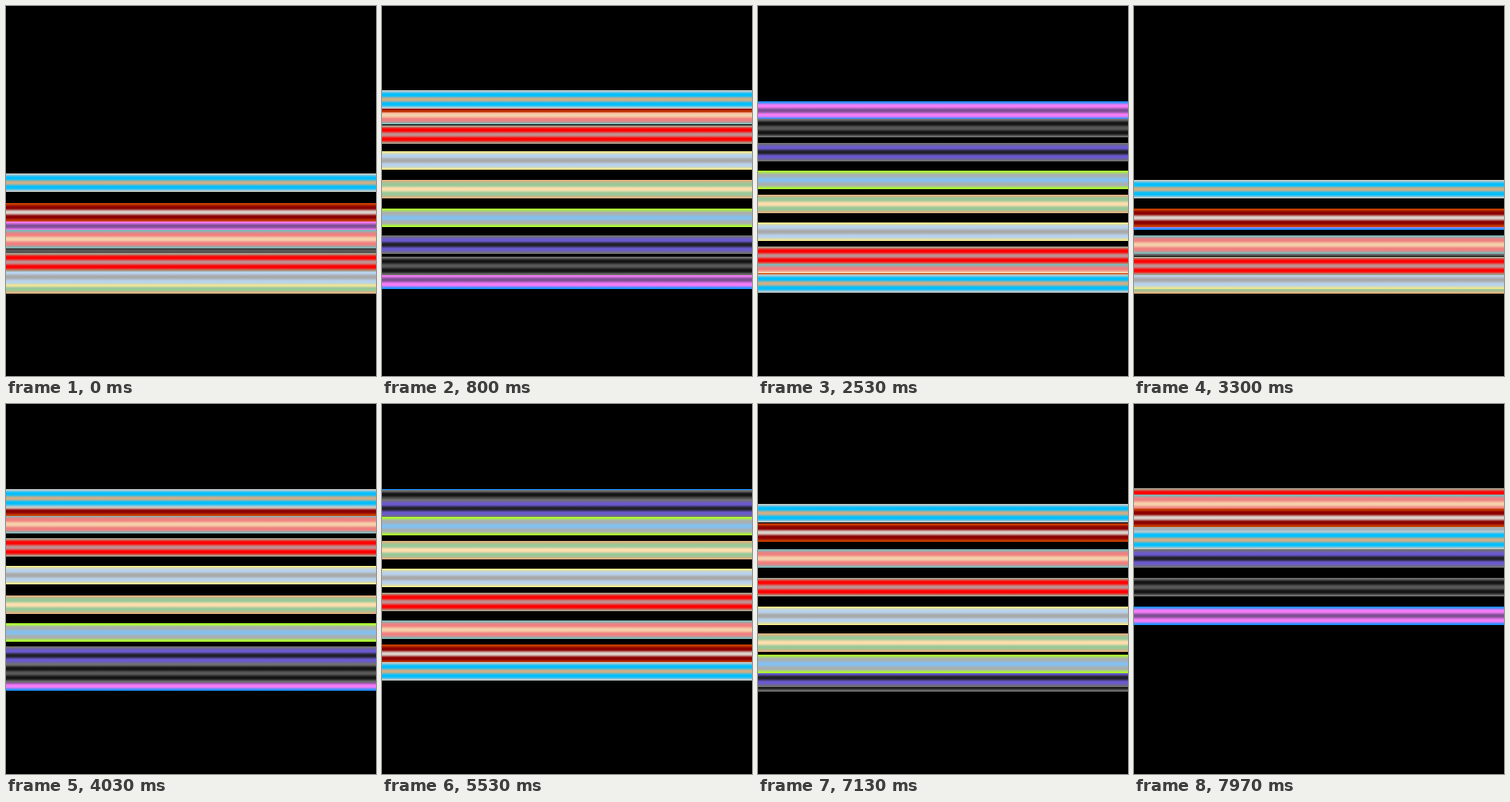
Recreate the animation shown at these times as an HTML page with a canvas. Size 400x400 px, loop 8000 ms.

```html
<!DOCTYPE html>
<html lang="en">
<head>
<meta charset="utf-8">
<title>Raster bars</title>
<style>
  html, body { margin: 0; width: 100%; height: 100%; overflow: hidden; background: #000; }
  canvas { display: block; width: 400px; height: 400px; }
</style>
</head>
<body>
<canvas id="stage" width="400" height="400"></canvas>
<script>
const SIZE = 400, BAR = 20, MIDDLE = 191, SWING = 100;
const LOOP_MS = 8000, FPS = 30;
const WAVE_STEPS = 100, BAR_LAG = 5, START_STEP = 48;

// Edge, body and core colour of each bar, front to back.
const bars = [
  ['#c0c8c8', '#00bfff', '#cdae88'],
  ['#c84000', '#8b0000', '#dcd2ca'],
  ['#7fb8b8', '#f08080', '#f5d0a9'],
  ['#a9a08c', '#ff0000', '#c09090'],
  ['#f0e68c', '#b8d2ec', '#a9a9a9'],
  ['#deb080', '#98c898', '#ffdead'],
  ['#adff2f', '#a9b0b0', '#84c0f0'],
  ['#707070', '#6a5acd', '#202028'],
  ['#707070', '#141414', '#585858'],
  ['#1e90ff', '#f57cf8', '#804f96']
];

const ctx = document.getElementById('stage').getContext('2d');

function barGradient([edge, body, core]) {
  const gradient = ctx.createLinearGradient(0, 0, 0, BAR);
  [edge, body, core, body, edge].forEach((color, i) => {
    const at = i / 4;
    gradient.addColorStop(Math.max(0, at - 0.05), color);
    gradient.addColorStop(Math.min(1, at + 0.05), color);
  });
  return gradient;
}

const fills = bars.map(barGradient);

// The wave includes both of its end points, so each bar rests briefly where it wraps.
function barTop(index, tick) {
  const step = (START_STEP - tick + BAR_LAG * index + 10 * WAVE_STEPS) % WAVE_STEPS;
  return Math.round(MIDDLE - SWING * Math.sin(2 * Math.PI * step / (WAVE_STEPS - 1)));
}

function draw(tick) {
  ctx.fillStyle = '#000';
  ctx.fillRect(0, 0, SIZE, SIZE);
  for (let i = bars.length - 1; i >= 0; i--) {
    ctx.save();
    ctx.translate(0, barTop(i, tick));
    ctx.fillStyle = fills[i];
    ctx.fillRect(0, 0, SIZE, BAR);
    ctx.restore();
  }
}

const start = performance.now();

function play() {
  const elapsed = (performance.now() - start) % LOOP_MS;
  const centis = Math.floor(elapsed / 10);
  draw(Math.floor((centis * 10 + 5) * FPS / 1000));
  requestAnimationFrame(play);
}

play();
</script>
</body>
</html>
```
